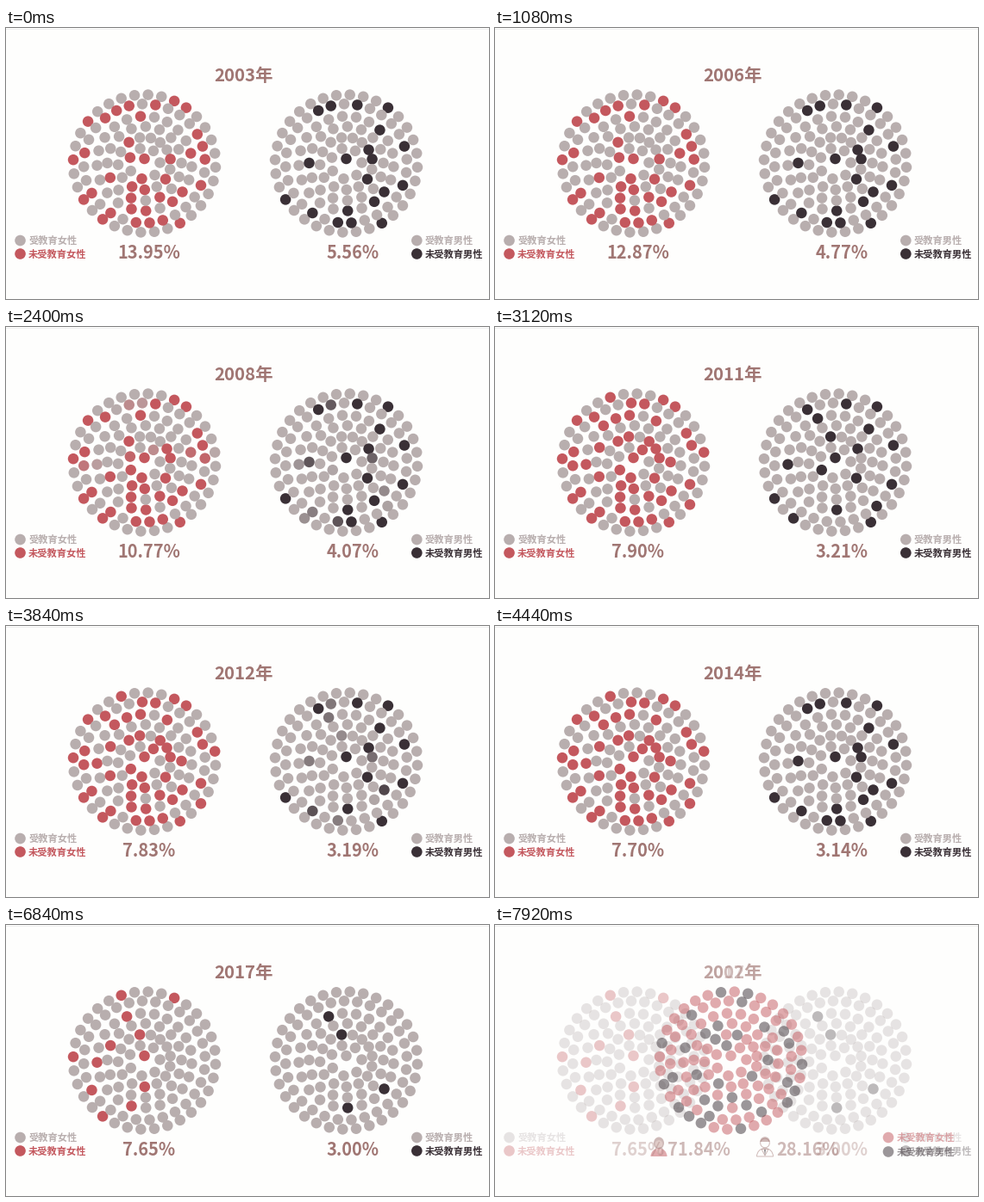
A matplotlib script that plays this animation: 560 px wide and 315 px high, repeating every 8000 ms.

```python
import numpy as np
import matplotlib.pyplot as plt
from matplotlib.animation import FuncAnimation
from matplotlib.patches import Circle, Ellipse, Polygon, Wedge

W, H, DPI = 560, 315, 100
STEP, SUB = 120, 3                      # picture hold in ms, ticks per hold
PX = 72 / DPI
PAPER, GRAY, RED, DARK = "#fefefd", "#b8aeae", "#c4585e", "#3a3036"
BROWN, SKIN = "#a07673", "#f3dfda"
ALWAYS = 9999


def ring(radius, count, start, lean=0, squash=0):
    """Evenly spaced dots, drawn a little towards the top of the ring."""
    a = np.radians(start) + np.arange(count) * 2 * np.pi / count
    a -= np.radians(lean) * (1 + np.cos(a - np.radians(70)))
    r = radius + squash * np.cos(2 * a)
    return np.column_stack([160.5 + r * np.cos(a), 157.5 + r * np.sin(a)])


DOTS = np.vstack([
    ring(81.3, 32, -87, squash=1.3),
    ring(69.8, 28, -92, lean=1.5, squash=0.6),
    ring(55, 21, -94.6, lean=3),
    ring(43, 16, -88, lean=2),
    ring(30.5, 14, -100, lean=9),
    ring(18, 7, -106),
    ring(5.5, 1, -90),
])
N = len(DOTS)

# Lit dots, counted outwards in: (from ms, to ms, dots)
FEMALE = [
    (-ALWAYS, ALWAYS, [2, 19, 24, 51, 72, 105, 118]),
    (-ALWAYS, 6150, [37, 68]),
    (-ALWAYS, 5150, [3, 13, 21, 27, 33, 38, 41, 45, 46, 47, 49, 54, 57, 60, 69, 71,
                     88, 90, 92, 101, 103, 106, 110, 115]),
    (-ALWAYS, 2400, [39, 58, 59, 65, 117]),
    (2700, ALWAYS, [30, 76, 80, 94, 97]),
    (2700, 6150, [7, 11, 62, 79, 85, 99]),
    (2300, 5150, [32, 53, 100, 112, 116]),
]
SWAY_A = [46, 47, 49, 59, 68, 69, 93, 101]
SWAY_B = [19, 43, 76, 80, 97, 116]
MALE = [
    (-ALWAYS, ALWAYS, [71]),
    (-ALWAYS, 6150, [3, 13, 21, 33, 38, 41, 58, 63, 100, 103, 118]),
    (-ALWAYS, 2500, SWAY_A), (2700, 3700, SWAY_B),
    (3900, 5200, SWAY_A), (5400, 6150, SWAY_B),
    (6150, ALWAYS, [68, 80, 97]),
]

YEAR_MS, YEAR_LEAD, LAST_YEAR = 487, 440, 2017
FADE_AT, FADE_MS, SWITCH_MS = 7440, 960, 400
SHARE_YEARS = [2003, 2006, 2007, 2011, 2014, 2016, 2017]
SHARE_F = [13.95, 12.87, 11.73, 7.90, 7.70, 8.18, 7.65]
SHARE_M = [5.56, 4.77, 4.36, 3.21, 3.14, 3.32, 3.00]

rng = np.random.default_rng(7)
JITTER = rng.uniform(-0.5, 0.5, N) * SWITCH_MS


def rgb(color):
    return np.array([int(color[i:i + 2], 16) for i in (1, 3, 5)]) / 255


def year_at(t):
    year = 2003 + int((t + YEAR_LEAD) // YEAR_MS)
    return min(year + (year >= 2010), LAST_YEAR)      # 2010 is left out


def dot_colors(groups, color, t):
    level = np.zeros(N)
    for start, end, ids in groups:
        now = t + JITTER[ids]
        rise = np.clip((now - start) / SWITCH_MS + 0.5, 0, 1)
        fall = np.clip((end - now) / SWITCH_MS + 0.5, 0, 1)
        level[ids] = np.maximum(level[ids], rise * fall)
    mix = level[:, None]
    return rgb(GRAY) * (1 - mix) + rgb(color) * mix


fig = plt.figure(figsize=(W / DPI, H / DPI), dpi=DPI, facecolor=PAPER)
ax = fig.add_axes([0, 0, 1, 1])
ax.set_xlim(0, W)
ax.set_ylim(H, 0)
ax.axis("off")
ax.plot([0, W], [0.5, 0.5], color="#f0f0f0", lw=PX, zorder=0)


def cloud(dx, colors):
    return ax.scatter(DOTS[:, 0] + dx, DOTS[:, 1], s=(12.5 * PX) ** 2, c=colors,
                      linewidths=0, zorder=1)


def label(x, y, text, size, color=BROWN, ha="center"):
    return ax.text(x, y, text, fontsize=size * PX, color=color, ha=ha, va="baseline",
                   family=["Noto Sans CJK JP"], weight="bold", zorder=3)


def title(text=""):
    return label(275.5, 61.6, text, 20.4)


def percent(x, text=""):
    return label(x, 268.4, text, 20)


def legend_row(x, y, text, color):
    dot = ax.add_patch(Circle((x, y), 6.3, fc=color, lw=0, zorder=2))
    return [dot, label(x + 9.7, y + 4.2, text, 11.25, color, "left")]


def woman(x, y):
    parts = [Ellipse((x, y - 4.5), 12, 14, fc=BROWN, lw=0, zorder=2),
             Circle((x, y - 3.5), 4.3, fc=SKIN, lw=0, zorder=2),
             Wedge((x, y + 11), 9.5, 180, 360, fc=RED, lw=0, zorder=2),
             Polygon([(x - 4, y + 2), (x + 4, y + 2), (x, y + 9)], fc=SKIN,
                     lw=0, zorder=2)]
    return [ax.add_patch(p) for p in parts]


def man(x, y):
    line = dict(fc=PAPER, ec=BROWN, lw=0.7, zorder=2)
    parts = [Wedge((x, y + 11), 9.5, 180, 360, **line),
             Circle((x, y - 4.5), 5.3, **line),
             Wedge((x, y - 6), 5.8, 180, 360, fc=BROWN, lw=0, zorder=2),
             Polygon([(x - 4, y + 2.5), (x + 4, y + 2.5), (x, y + 10)], **line),
             Polygon([(x - 1.2, y + 3), (x + 1.2, y + 3), (x, y + 10)], fc=DARK,
                     lw=0, zorder=2)]
    return [ax.add_patch(p) for p in parts]


cloud_f, cloud_m = cloud(0, GRAY), cloud(234, GRAY)
year_text, pct_f, pct_m = title(), percent(166), percent(402.3)
first = [cloud_f, cloud_m, year_text, pct_f, pct_m]
for x, sex, color in [(16.5, "女性", RED), (476.3, "男性", DARK)]:
    first += legend_row(x, 247, "受教育" + sex, GRAY)
    first += legend_row(x, 262.5, "未受教育" + sex, color)

men_share = 28.16
shared = np.tile(rgb(RED), (N, 1))
shared[rng.choice(N, round(N * men_share / 100), replace=False)] = rgb(DARK)
second = [cloud(113, shared), title("2002年"),
          percent(236.5, f"{100 - men_share:.2f}%"), percent(362.5, f"{men_share}%")]
second += legend_row(456, 247, "未受教育女性", RED)
second += legend_row(456, 263.5, "未受教育男性", DARK)
second += woman(190, 258) + man(313, 258)


def draw(tick):
    t = tick // SUB * STEP
    year = year_at(t)
    year_text.set_text(f"{year}年")
    pct_f.set_text(f"{np.interp(year, SHARE_YEARS, SHARE_F):.2f}%")
    pct_m.set_text(f"{np.interp(year, SHARE_YEARS, SHARE_M):.2f}%")
    cloud_f.set_facecolor(dot_colors(FEMALE, RED, t))
    cloud_m.set_facecolor(dot_colors(MALE, DARK, t))
    p = float(np.clip((t - FADE_AT) / FADE_MS, 0, 1))
    for art in first:
        art.set_alpha((1 - p) ** 1.6)
    for art in second:
        art.set_alpha(p)
        art.set_visible(p > 0)
    return first + second


anim = FuncAnimation(fig, draw, frames=200, interval=40, repeat=True,
                     repeat_delay=0, blit=False)
plt.show()
```
